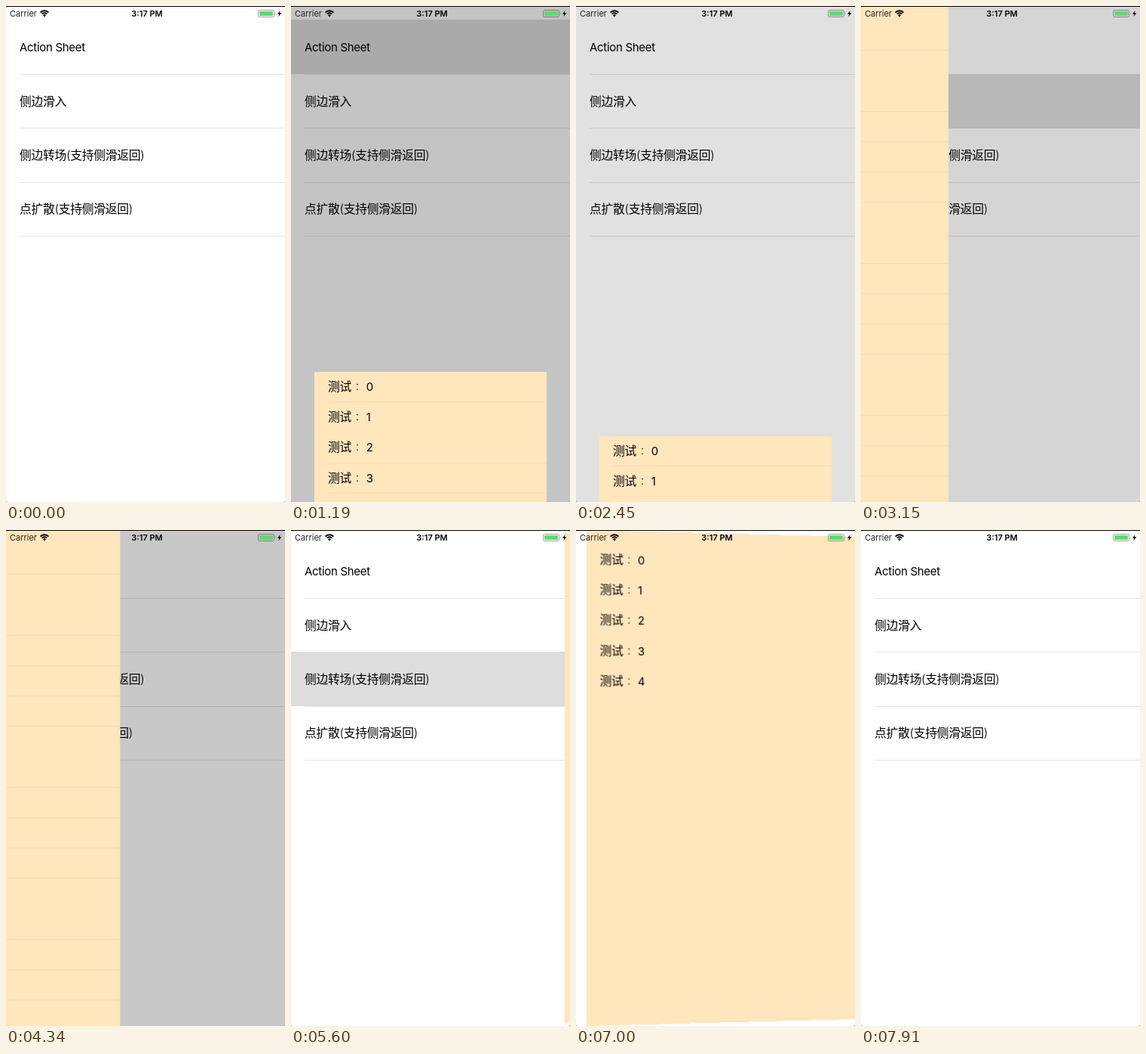
These frames come from a looping animation (370x656 px, 8 s). An HTML page:

```html
<!DOCTYPE html>
<html lang="zh-CN">
<head>
<meta charset="utf-8">
<title>Transitions</title>
<style>
@property --sheet { syntax: "<number>"; inherits: true; initial-value: 0; }
@property --side { syntax: "<number>"; inherits: true; initial-value: 0; }
@property --page { syntax: "<number>"; inherits: true; initial-value: 0; }

html, body { margin: 0; width: 100%; height: 100%; overflow: hidden; background: #777; }
#stage {
  position: relative; width: 370px; height: 656px; overflow: hidden;
  background: #fff; color: #000; border-radius: 0 0 2px 2px;
  font: 350 15.8px Inter, "Noto Sans CJK SC", "Noto Sans CJK", sans-serif;
  letter-spacing: -.3px; white-space: nowrap;
  animation-name: sheet, side, page;
}
#stage, #pick {
  animation-duration: 8s; animation-timing-function: linear;
  animation-iteration-count: infinite; animation-play-state: paused;
  animation-delay: calc(var(--t, 0) * -1ms);
}
#stage > * { position: absolute; }
i { font-style: normal; font-weight: 400; font-size: 15px; }
.colon { display: inline-block; width: 15.5px; text-align: center; position: relative; top: -1px; }

.row { left: 18px; right: 0; height: 70px; line-height: 71px; }
.line { left: 18px; right: 0; height: 1px; background: #e6e6e8; }
#pick { left: 0; width: 370px; height: 72px; background: #ddd; animation-name: pick, spot; }

#dim { inset: 0; background: #000; opacity: calc(.4 * max(var(--sheet), var(--side))); }
.menu {
  background: #ffe6bd; box-sizing: border-box; line-height: 40.2px; overflow: hidden;
}
.menu div { height: 40.2px; padding-left: 18px; }
.ruled {
  background: repeating-linear-gradient(transparent 0 39.4px, rgba(90, 60, 20, .06) 39.4px 40.2px) 18px var(--pad, 0) no-repeat #ffe6bd;
}
#sheet {
  left: 31px; top: 357px; width: 308px; height: 263px;
  transform: translateY(calc((1 - var(--sheet)) * 300px));
}
#side {
  --pad: 18.6px; padding-top: var(--pad);
  left: 0; top: 0; width: 281px; height: 656px;
  transform: translateX(calc((var(--side) - 1) * 281px));
}
#page {
  padding-top: 19px; left: 0; top: 0; width: 370px; height: 656px;
  transform-origin: 0 50%;
  transform: translateX(calc((1 - var(--page)) * 370px)) perspective(500px)
    rotateY(calc((1 - var(--page)) * 60deg));
}

#bar { inset: 0 0 auto; height: 20px; border-top: 1px solid #000; box-sizing: border-box;
  font-size: 11px; font-weight: 400; line-height: 19px; letter-spacing: 0; }
#bar > * { position: absolute; top: 0; }
#carrier { left: 5px; color: #222; }
#clock { left: 137px; width: 100px; text-align: center; font-weight: 600; }
#bar svg { left: 0; top: -1px; }

@keyframes sheet {
  0% { --sheet: 0; }
  13% { --sheet: 0; animation-timing-function: linear(0, .096 5%, .279 10%, .462 15%, .615 20%, .818 30%, .919 40%, .966 50%, .986 60%, .998 80%, 1); }
  23% { --sheet: 1; }
  23.625% { --sheet: 1; animation-timing-function: cubic-bezier(.8, 0, .6, 1); }
  33.25%, 100% { --sheet: 0; }
}
@keyframes side {
  0% { --side: 0; }
  38.01% { --side: 0; animation-timing-function: linear(0, .096 5%, .279 10%, .462 15%, .615 20%, .818 30%, .919 40%, .966 50%, .986 60%, .998 80%, 1); }
  48.01% { --side: 1; }
  51.625% { --side: 1; animation-timing-function: cubic-bezier(.3, .29, .4, 1); }
  60.375%, 100% { --side: 0; }
}
@keyframes page {
  0% { --page: 0; }
  69.92% { --page: 0; animation-timing-function: linear(0, .096 5%, .279 10%, .462 15%, .615 20%, .818 30%, .919 40%, .966 50%, .986 60%, .998 80%, 1); }
  77.92% { --page: 1; }
  85.75% { --page: 1; animation-timing-function: cubic-bezier(.6, 0, .5, 1); }
  95.375%, 100% { --page: 0; }
}
@keyframes pick {
  0%, 13% { opacity: 0; }
  13.01%, 15% { opacity: 1; }
  20%, 38% { opacity: 0; }
  38.01%, 40% { opacity: 1; }
  45%, 69.9% { opacity: 0; }
  69.91%, 72% { opacity: 1; }
  77%, 100% { opacity: 0; }
}
@keyframes spot {
  0%, 30% { top: 18px; }
  30.01%, 60% { top: 90px; }
  60.01%, 100% { top: 161px; }
}
</style>
</head>
<body>
<div id="stage">
  <div class="line" style="top:90px"></div>
  <div class="line" style="top:161px"></div>
  <div class="line" style="top:233px"></div>
  <div class="line" style="top:304px"></div>
  <div id="pick"></div>
  <div class="row" style="top:19px"><i>Action Sheet</i></div>
  <div class="row" style="top:91px">侧边滑入</div>
  <div class="row" style="top:162px">侧边转场(支持侧滑返回)</div>
  <div class="row" style="top:233px">点扩散(支持侧滑返回)</div>
  <div id="dim"></div>
  <div id="sheet" class="menu ruled"></div>
  <div id="side" class="menu ruled"></div>
  <div id="page" class="menu"></div>
  <div id="bar">
    <span id="carrier">Carrier</span>
    <span id="clock">3:17 PM</span>
    <svg width="370" height="20" fill="none">
      <path d="M45.6 8.6a7.4 7.4 0 0 1 10.8 0M47.7 10.7a4.5 4.5 0 0 1 6.6 0" stroke="#000" stroke-width="1.9"/>
      <path d="M51 14.4l-2-2.1a2.8 2.8 0 0 1 4 0z" fill="#000"/>
      <rect x="334.5" y="5.5" width="21" height="9" rx="2" stroke="#000" stroke-opacity=".36"/>
      <rect x="336" y="7" width="18" height="6" rx=".8" fill="#62d877"/>
      <path d="M357 8.3q1.4 1.7 0 3.4z" fill="#000" fill-opacity=".45"/>
      <path d="M363.6 6l-3.6 4.7h2.3l-1 3.5 4-5h-2.5z" fill="#000"/>
    </svg>
  </div>
</div>
<script>
const items = [0, 1, 2, 3, 4]
  .map(n => `<div>测试<span class="colon">:</span> <i>${n}</i></div>`).join('');
document.querySelectorAll('.menu').forEach(m => { m.innerHTML = items; });

const LOOP = 8000, STEP = 70;
const root = document.documentElement;
const start = performance.now();
function tick() {
  const t = (performance.now() - start) % LOOP;
  root.style.setProperty('--t', Math.floor(t / STEP) * STEP);
  requestAnimationFrame(tick);
}
tick();
</script>
</body>
</html>
```
